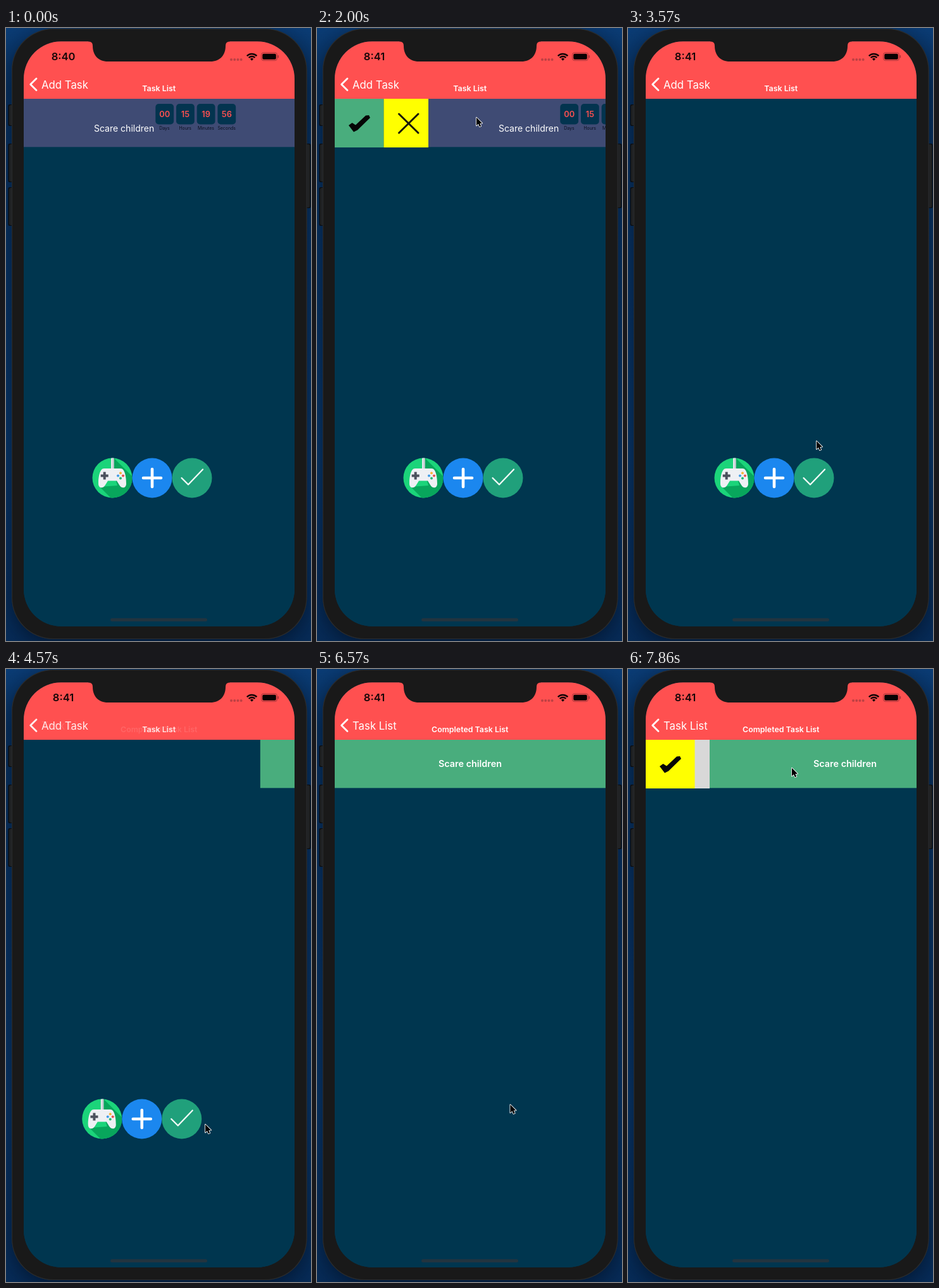
These frames come from a looping animation (482x970 px, 8 s). An HTML page with a canvas:

```html
<!DOCTYPE html>
<html lang="en">
<head>
<meta charset="utf-8">
<title>Task list</title>
<style>
html, body { margin: 0; width: 100%; height: 100%; overflow: hidden; background: #062c59; }
canvas { display: block; width: 482px; height: 970px; }
</style>
</head>
<body>
<canvas id="stage"></canvas>
<script>
const LOOP = 8000, FPS = 7, W = 482, H = 970;
const RED = '#ff5050', NAVY = '#00364f', GREEN = '#49ad7d', ROW = '#3f4b74';
const SCREEN = { x: 28, y: 21.3, w: 428, h: 925.5 };

const canvas = document.getElementById('stage');
const dpr = window.devicePixelRatio || 1;
canvas.width = W * dpr;
canvas.height = H * dpr;
const c = canvas.getContext('2d');

// Pointer path: tick, x, y
const PATH = [
  [4, 236, 330], [9, 100, 140], [10, 100, 140], [14, 251, 140], [15, 257, 141],
  [18, 70, 147], [22, 70, 147], [25, 297, 652], [28, 314, 719], [45, 314, 719],
  [52, 142, 154], [55, 258, 155]
];
const TICK = { clock: 4, swipe: 10, removed: 20, push: 31.57, pushEnd: 37, swipeDone: 52 };

const mix = (a, b, p) => a + (b - a) * p;
const smooth = p => p * p * (3 - 2 * p);

function pointerAt(k) {
  if (k < PATH[0][0]) return null;
  for (let i = 1; i < PATH.length; i++) {
    const [k0, x0, y0] = PATH[i - 1], [k1, x1, y1] = PATH[i];
    if (k <= k1) {
      const p = smooth((k - k0) / (k1 - k0));
      return [mix(x0, x1, p), mix(y0, y1, p)];
    }
  }
  return PATH[PATH.length - 1].slice(1);
}

function pushAt(k) {
  if (k <= TICK.push) return 0;
  if (k >= TICK.pushEnd) return 1;
  const s = (k - TICK.push) / FPS * 10;
  return 1 - (1 + s) * Math.exp(-s);
}

function rect(x, y, w, h, color) {
  c.fillStyle = color;
  c.fillRect(x, y, w, h);
}

function round(x, y, w, h, r, color) {
  c.fillStyle = color;
  c.beginPath();
  c.roundRect(x, y, w, h, r);
  c.fill();
}

function disc(x, y, r, color) {
  c.fillStyle = color;
  c.beginPath();
  c.arc(x, y, r, 0, 7);
  c.fill();
}

function trace(points) {
  c.beginPath();
  points.forEach(([x, y]) => c.lineTo(x, y));
}

function poly(points, color) {
  trace(points);
  c.fillStyle = color;
  c.fill();
}

function line(points, color, width) {
  trace(points);
  c.strokeStyle = color;
  c.lineWidth = width;
  c.lineCap = c.lineJoin = 'round';
  c.stroke();
}

function text(str, x, y, size, color, weight = 400, align = 'center') {
  c.font = `${weight} ${size}px Inter, Roboto, sans-serif`;
  c.textAlign = align;
  c.fillStyle = color;
  c.fillText(str, x, y);
}

function drawPhone() {
  const bg = c.createLinearGradient(0, 0, 0, H);
  bg.addColorStop(0, '#0a3b74');
  bg.addColorStop(0.1, '#07305f');
  bg.addColorStop(0.7, '#083669');
  bg.addColorStop(1, '#062a56');
  rect(0, 0, W, H, bg);
  c.save();
  c.shadowColor = 'rgba(0,8,24,.6)';
  c.shadowBlur = 34 * dpr;
  c.shadowOffsetY = 8 * dpr;
  round(9, 1, 466.5, 966, 66, '#2a2c2e');
  c.restore();
  const buttons = [[3.5, 121, 34], [3.5, 183, 61], [3.5, 252, 61], [470.5, 183, 102]];
  for (const [x, y, h] of buttons) {
    round(x, y, 11, h, 2, '#0b0d10');
    round(x + 1.5, y + 1, 8, h - 2, 2, '#202224');
  }
  round(9, 1, 466.5, 966, 66, '#2a2c2e');
  round(10, 2, 464.5, 964, 65, '#191919');
}

function drawNotch() {
  c.fillStyle = '#191919';
  c.beginPath();
  c.moveTo(130, 20);
  c.lineTo(130, 21.3);
  c.quadraticCurveTo(137, 21.3, 137, 28);
  c.bezierCurveTo(137, 43, 146, 53, 161, 53);
  c.lineTo(323, 53);
  c.bezierCurveTo(338, 53, 347, 43, 347, 28);
  c.quadraticCurveTo(347, 21.3, 354, 21.3);
  c.lineTo(354, 20);
  c.fill();
}

function drawStatus(k) {
  text(k < TICK.clock ? '8:40' : '8:41', 90.6, 51, 16.6, '#160708', 600);
  for (let i = 0; i < 4; i++) disc(356 + i * 5.2, 50, 2, '#bd4043');
  c.strokeStyle = '#120506';
  c.lineCap = 'butt';
  c.lineWidth = 2.5;
  for (const r of [10.6, 6.6]) {
    c.beginPath();
    c.arc(388.5, 51.5, r, -Math.PI * 0.76, -Math.PI * 0.24);
    c.stroke();
  }
  poly([[385.8, 48.8], [388.5, 47.5], [391.2, 48.8], [388.5, 51.8]], '#120506');
  c.strokeStyle = '#a63539';
  c.lineWidth = 1;
  c.beginPath();
  c.roundRect(403.5, 39, 25, 12.5, 3.5);
  c.stroke();
  round(405.2, 40.7, 21.6, 9.1, 2, '#080203');
  round(429.5, 43, 1.6, 4.5, 1, '#a63539');
}

function drawNav(back, title, alpha) {
  c.globalAlpha = alpha;
  line([[48, 80], [38.7, 89.3], [48, 98.6]], '#fff', 2.8);
  text(back, 56, 96, 16.8, '#fff', 400, 'left');
  text(title, 241.7, 100.3, 12.4, '#fff', 600);
  c.globalAlpha = 1;
}

function drawTick() {
  poly([[50, 154], [55.5, 150], [61, 153.5], [77, 138.5], [82, 138], [84, 142], [64, 161.5], [58, 164.5]], '#060606');
}

function drawCountdown(secs) {
  const units = [['00', 'Days'], ['15', 'Hours'], ['19', 'Minutes'], [String(secs), 'Seconds']];
  units.forEach(([value, label], i) => {
    const x = 236.3 + i * 32.7;
    round(x, 120, 28.8, 32.5, 5, '#03344f');
    text(value, x + 14.4, 140.8, 12.8, RED, 600);
    text(label, x + 14.2, 161, 6.9, '#0b1020');
  });
}

function drawPad() {
  c.save();
  c.beginPath();
  c.arc(168, 712, 31.5, 0, 7);
  c.clip();
  rect(136, 680, 64, 64, '#1bd47a');
  poly([[170, 680], [202, 712], [202, 746], [168, 746], [148, 726], [176, 724], [168, 696]], '#08a65c');
  rect(166, 680, 4.5, 19, '#e4e7ec');
  rect(168.2, 680, 2.3, 19, '#c4cad2');
  c.restore();
  c.fillStyle = '#eef0f4';
  c.beginPath();
  c.moveTo(155, 697);
  c.lineTo(181, 697);
  c.bezierCurveTo(188, 697, 190, 711, 190, 721);
  c.bezierCurveTo(190, 729, 182, 729, 179, 723);
  c.lineTo(175, 716.5);
  c.lineTo(161, 716.5);
  c.lineTo(157, 723);
  c.bezierCurveTo(154, 729, 146, 729, 146, 721);
  c.bezierCurveTo(146, 711, 148, 697, 155, 697);
  c.fill();
  rect(153.7, 702.5, 4, 12, '#4b505d');
  rect(149.7, 706.5, 12, 4, '#4b505d');
  disc(181, 704.3, 2, '#f4b63c');
  disc(177, 708.5, 2, '#3d9be8');
  disc(185, 708.5, 2, '#e9504e');
  disc(181, 712.6, 2, '#21bd72');
}

function drawActions() {
  drawPad();
  disc(231, 712, 31.5, '#1b87ef');
  line([[217, 712], [245, 712]], '#fff', 4.6);
  line([[231, 698], [231, 726]], '#fff', 4.6);
  disc(294, 712, 31.5, '#20a07b');
  line([[277.5, 712], [288, 722.5], [311, 698.5]], '#f4fbf8', 2.3);
}

function drawTasks(k, slide) {
  rect(28, 112, 428, 835, NAVY);
  if (k < TICK.removed) {
    if (slide > 0) {
      rect(28, 112, 77.5, 77, GREEN);
      rect(105.5, 112, Math.max(0, slide - 77.5), 77, '#ffff00');
      c.save();
      c.beginPath();
      c.rect(28, 112, slide, 77);
      c.clip();
      drawTick();
      line([[129.5, 136], [160, 166]], '#17170a', 3);
      line([[160, 136], [129.5, 166]], '#17170a', 3);
      c.restore();
    }
    c.save();
    c.translate(slide, 0);
    rect(28, 112, 428, 76.3, ROW);
    text('Scare children', 139, 164, 14, '#fff', 400, 'left');
    drawCountdown(56 - Math.floor((k + 5) / 7));
    c.restore();
  }
  drawActions();
}

function drawDone(slide) {
  rect(28, 112, 428, 835, NAVY);
  if (slide > 0) {
    rect(28, 112, slide, 77, '#d8d8d8');
    rect(28, 112, Math.min(slide, 77.5), 77, '#ffff00');
    drawTick();
  }
  rect(28 + slide, 112, 428, 76.3, GREEN);
  text('Scare children', 242 + slide, 155, 14.4, '#fff', 600);
}

function drawPointer([x, y]) {
  c.save();
  c.translate(x + 0.9, y + 1.6);
  c.scale(0.86, 0.86);
  trace([[0, 0], [0, 15], [3.5, 11.8], [5.9, 17], [8.5, 15.9], [6.3, 10.8], [10.6, 10.6]]);
  c.closePath();
  c.lineJoin = 'round';
  c.lineWidth = 2;
  c.strokeStyle = '#fff';
  c.stroke();
  c.fillStyle = '#000';
  c.fill();
  c.restore();
}

function draw(k) {
  const pointer = pointerAt(k), p = pushAt(k);
  let slide = 0;
  if (k >= TICK.swipe && k < TICK.removed) {
    slide = k <= 15 ? Math.max(0, pointer[0] - 103) : 154;
  } else if (k > TICK.swipeDone) {
    slide = Math.max(0, pointer[0] - 157);
  }

  c.setTransform(dpr, 0, 0, dpr, 0, 0);
  drawPhone();

  c.save();
  c.beginPath();
  c.roundRect(SCREEN.x, SCREEN.y, SCREEN.w, SCREEN.h, 59);
  c.clip();
  rect(28, 21, 428, 926, NAVY);
  if (p < 1) {
    c.save();
    c.translate(-p * SCREEN.w * 0.3, 0);
    drawTasks(k, slide);
    c.restore();
  }
  if (p > 0) {
    c.save();
    c.translate((1 - p) * SCREEN.w, 0);
    drawDone(slide);
    c.restore();
  }
  rect(28, 21, 428, 91, RED);
  if (p < 1) drawNav('Add Task', 'Task List', 1 - p);
  if (p > 0) drawNav('Task List', 'Completed Task List', p);
  drawStatus(k);
  round(165, 934, 153, 5, 2.5, '#22343f');
  c.restore();

  drawNotch();
  if (pointer) drawPointer(pointer);
}

function loop() {
  const t = performance.now() % LOOP;
  draw(Math.floor(t * FPS / 1000 + 0.02));
  requestAnimationFrame(loop);
}
loop();
</script>
</body>
</html>
```
